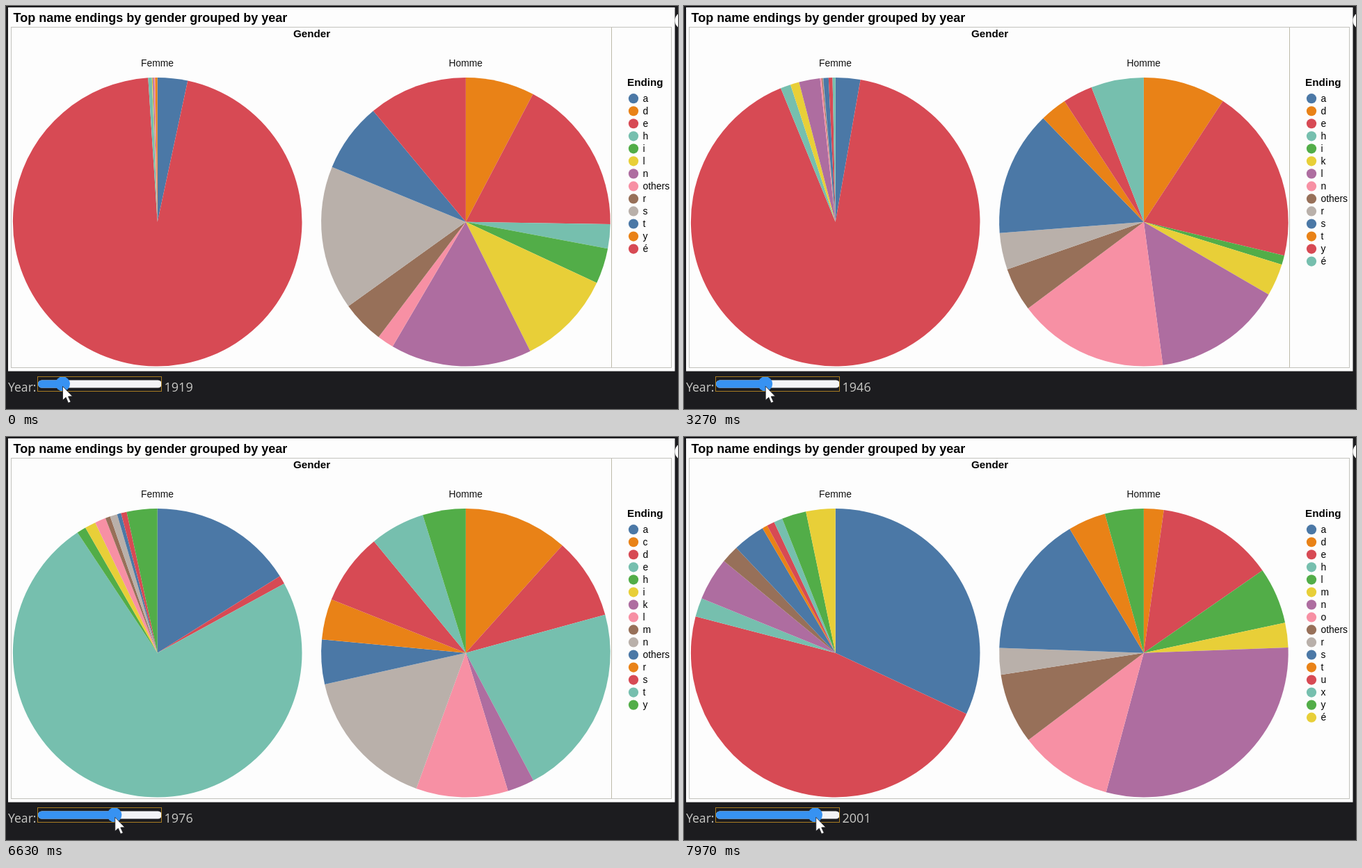
Animation, 966 px wide and 580 px high, one loop 8 s. Source, as an HTML page with a canvas:

```html
<!DOCTYPE html>
<html lang="en">
<head>
<meta charset="utf-8">
<title>Name endings by year</title>
<style>
  html, body { margin: 0; width: 100%; height: 100%; overflow: hidden; background: #1c1c1f; }
  canvas { display: block; }
</style>
</head>
<body>
<canvas id="stage" width="966" height="580"></canvas>
<script>
const LOOP = 8000;
const SANS = '"Liberation Sans", Arial, sans-serif';
const PALETTE = ['#4b78a6', '#e98217', '#d74a54', '#76bfae', '#52ad48',
                 '#e8cf38', '#ae6da0', '#f790a4', '#977059', '#b9b0aa'];
const ctx = document.getElementById('stage').getContext('2d');

// Each slice is a letter and its end angle in degrees; the last one closes the circle. O = others.
const parse = text => {
  const shares = {};
  let start = 0;
  for (const part of text.split(' ')) {
    const end = +part.slice(1) || 360;
    shares[part[0]] = end - start;
    start = end;
  }
  return shares;
};

// time: when the year is reached; since: first year that uses this set of endings
const key = (time, year, since, endings, femme, homme) =>
  ({ time, year, since, endings: [...endings], pies: [parse(femme), parse(homme)] });

const keys = [
  key(0, 1919, 1900, 'adehilnOrstyé',
    'a12.1 e356.3 h357.8 l358.1 n358.6 O359.1 y',
    'd27.7 e90.9 h100.7 i115 l153.5 n210.4 O217.1 r234.3 s292.3 t320.2 é'),
  key(1970, 1932, 1926, 'adehiklnOrstyé',
    'a8 e354.3 h356.1 k356.7 l357.1 n357.7 r358.2 s359.4 y',
    'd34.9 e96.9 i106.2 l150.5 n208.4 O221.1 r237.7 s289.2 t315.9 y324.9 é'),
  key(4100, 1955, 1948, 'acdehklmnOrsyé',
    'a11.2 e326.1 h331.7 k337.1 l350.7 m351.8 n352.5 O353.2 s355.9 y358.1 é',
    'c19.6 d49.9 e121.7 k142.3 l196.7 n256 O275.9 r288.6 s335.5 y348.9 é'),
  key(5830, 1961, 1958, 'acdehklmnOrstyé',
    'a23.1 e331.4 h336.7 k339.9 l349.5 m351.4 n352.1 O352.7 s356.6 y358.8 é',
    'c36.9 d55.2 e131.8 k150.8 l202.9 n243.1 O270 r288.1 s329 t341.9 y'),
  key(6630, 1976, 1969, 'acdehiklmnOrsty',
    'a57.9 d61.3 e326.4 h330.1 i334.5 l338.9 m340.9 n343.8 O345.4 s347.7 y',
    'c41.9 d74.7 e152.1 k163 l200 n257.4 O275.4 r291.7 s320.6 t342.7 y'),
  key(7330, 1989, 1983, 'acdehlnOrstuxyé',
    'a75.1 d77.5 e296.9 h305 n318.4 O324 r328.6 s334.6 x336.9 y357 é',
    'c15.3 d32.4 e90.8 l115 n229 O251 r262.2 s295.5 t318.9 u328.1 y'),
  key(7970, 2001, 1996, 'adehlmnoOrstuxyé',
    'a115 e284.6 h292.2 n309.5 O316.7 s329.7 t331.8 u334.9 x338.4 y348.2 é',
    'd8 e55.2 l77.9 m87.9 n195.1 o232.9 O261.3 r272 s329.2 t344.4 y')
];

const lerp = (a, b, k) => a + (b - a) * k;

// The neighbouring keys around a value of one field, and the position between them.
function between(field, value) {
  let i = 0;
  while (i < keys.length - 2 && keys[i + 1][field] <= value) i++;
  const a = keys[i], b = keys[i + 1];
  return [a, b, Math.min(1, (value - a[field]) / (b[field] - a[field]))];
}

function text(string, x, y, font, color = '#000', align = 'left') {
  ctx.font = font;
  ctx.fillStyle = color;
  ctx.textAlign = align;
  ctx.fillText(string, x, y);
}

function disc(x, y, r, color) {
  ctx.fillStyle = color;
  ctx.beginPath();
  ctx.arc(x, y, r, 0, Math.PI * 2);
  ctx.fill();
}

function box(x, y, w, h, color) {
  ctx.fillStyle = color;
  ctx.fillRect(x, y, w, h);
}

function bar(x, y, w, h, color) {
  ctx.fillStyle = color;
  ctx.beginPath();
  ctx.roundRect(x, y, w, h, h / 2);
  ctx.fill();
}

function frame(x, y, w, h, color) {
  ctx.strokeStyle = color;
  ctx.lineWidth = 1;
  ctx.strokeRect(x, y, w, h);
}

function pie(index, cx, year, endings) {
  const [a, b, k] = between('year', year);
  const sizes = endings.map(e => lerp(a.pies[index][e] || 0, b.pies[index][e] || 0, k));
  const unit = Math.PI * 2 / sizes.reduce((sum, size) => sum + size, 0);
  const cy = 310.7, r = 207.8;
  let start = -Math.PI / 2;
  sizes.forEach((size, i) => {
    if (!size) return;
    const end = start + size * unit;
    ctx.fillStyle = PALETTE[i % PALETTE.length];
    ctx.beginPath();
    ctx.moveTo(cx, cy);
    ctx.arc(cx, cy, r, start, end);
    ctx.fill();
    start = end;
  });
}

function legend(endings) {
  text('Ending', 893, 115, `bold 15.2px ${SANS}`);
  endings.forEach((ending, i) => {
    const y = 133.2 + i * 18.03;
    disc(902, y, 7.1, PALETTE[i % PALETTE.length]);
    text(ending === 'O' ? 'others' : ending, 915.5, y + 4.5, `13.85px ${SANS}`);
  });
}

function slider(year) {
  const font = '"Open Sans", "Noto Sans", sans-serif';
  const x = 81.5 + (year - 1919) * 1.305;
  text('Year:', 3, 555, `17.6px ${font}`, '#c9c9c6');
  text(year, 227.5, 555, `18px ${font}`, '#c9c9c6');
  bar(46, 538.5, 178, 11, '#f3f3f6');
  bar(46, 538.5, x - 46, 11, '#3792f2');
  disc(x, 543.8, 10.5, '#3792f2');
  frame(45.5, 533.5, 178, 21, '#a87c22');
}

function pointer(x, y) {
  const outline = [[0, 0], [0, 20], [4.6, 16], [8, 24], [11.5, 22.5], [8, 14.7], [14, 14.5]];
  ctx.beginPath();
  outline.forEach(([dx, dy]) => ctx.lineTo(x + dx, y + dy));
  ctx.closePath();
  ctx.fillStyle = '#fff';
  ctx.fill();
  ctx.strokeStyle = '#1c1c1f';
  ctx.lineWidth = 0.8;
  ctx.stroke();
}

function draw(time) {
  const [a, b, k] = between('time', time);
  const exactYear = lerp(a.year, b.year, k);
  const year = Math.round(exactYear);
  const { endings } = keys.findLast(entry => entry.since <= year);

  box(0, 0, 966, 580, '#1c1c1f');
  box(3, 2, 958.5, 523.6, '#fdfdfd');
  disc(974, 21, 12.5, '#fdfdfd');

  frame(7.5, 30.5, 949, 490, '#c3c2bd');
  if (time < 7000) box(870, 31, 1, 489, '#bebaa9');
  if (time > 3500 && time < 4900) box(924, 31, 1, 489, '#c6c6c2');

  text('Top name endings by gender grouped by year', 10.5, 23, `bold 18px ${SANS}`);
  text('Gender', 439.5, 45, `bold 15.2px ${SANS}`, '#000', 'center');
  text('Femme', 217.5, 87, `13.85px ${SANS}`, '#111', 'center');
  text('Homme', 660.8, 87, `13.85px ${SANS}`, '#111', 'center');

  pie(0, 217.7, year, endings);
  pie(1, 660.9, year, endings);
  legend(endings);
  slider(year);
  pointer(81.5 + (exactYear - 1919) * 1.32, 547.3);
}

function tick() {
  draw(performance.now() % LOOP);
  requestAnimationFrame(tick);
}
tick();
</script>
</body>
</html>
```
